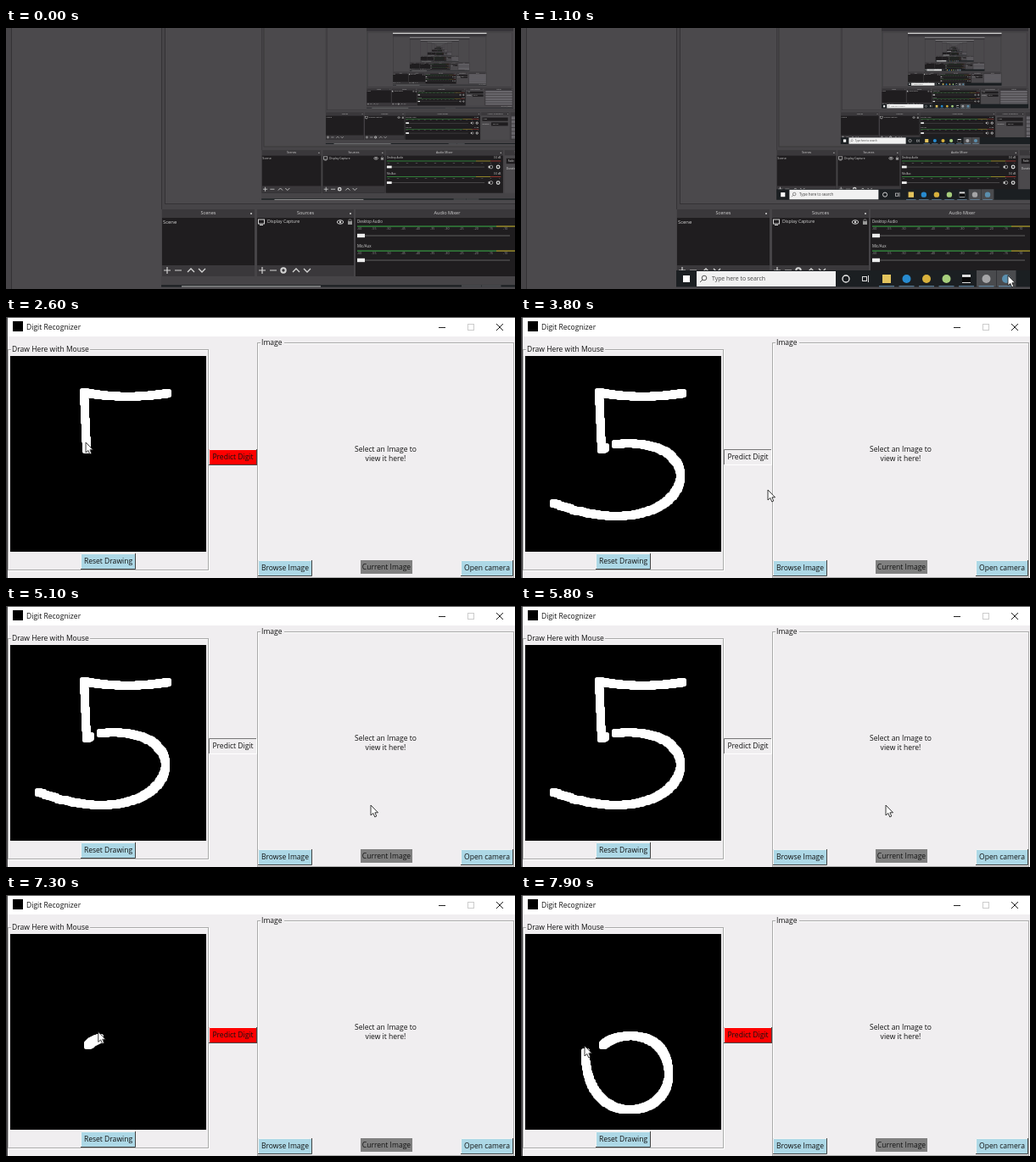
An HTML page with a canvas for the animation above (8 s loop, 600 by 308 pixels).

```html
<!DOCTYPE html>
<html lang="en">
<head>
<meta charset="utf-8">
<title>Digit Recognizer</title>
<style>
html, body { margin: 0; width: 100%; height: 100%; overflow: hidden; background: #4b494c; }
canvas { display: block; }
</style>
</head>
<body>
<canvas id="stage" width="600" height="308"></canvas>
<script>
const c = document.getElementById('stage').getContext('2d');
const LOOP = 8000, WINDOW_OPENS = 1300, CLEARED = 6880;

function rect(color, x, y, w, h) {
  c.fillStyle = color;
  c.fillRect(x, y, w, h);
}

function frameRect(color, x, y, w, h) {
  c.strokeStyle = color;
  c.lineWidth = 1;
  c.strokeRect(x + 0.5, y + 0.5, w, h);
}

function text(s, x, y, size = 8.55, color = '#111', align = 'left') {
  c.font = size + 'px "Open Sans", "Noto Sans", sans-serif';
  c.textAlign = align;
  c.textBaseline = 'middle';
  c.fillStyle = color;
  c.fillText(s, x, y);
}

function line(color, width, ...p) {
  c.strokeStyle = color;
  c.lineWidth = width;
  c.beginPath();
  for (let i = 0; i < p.length; i += 2) c.lineTo(p[i], p[i + 1]);
  c.stroke();
}

function circle(x, y, r, color, width) {
  c.beginPath();
  c.arc(x, y, r, 0, 7);
  c.fillStyle = c.strokeStyle = color;
  c.lineWidth = width || 1;
  width ? c.stroke() : c.fill();
}

// ---- Recorder screen, nested inside its own preview ----
const LIGHT = '#d4d4d4', BLACK = '#1f1d1f', HEADER = '#3a383b', PANEL = '#4b494c', RIM = '#343235';
const LEFT = 183, TOP = -67, WIDTH = 660, BOTTOM = 305.6;

function dock(title, x, w, fill = BLACK) {
  rect(HEADER, x, 214, w, 10);
  text(title, x + w / 2, 219, 5.5, LIGHT, 'center');
  rect('#aaa', x + w - 5, 218, 2, 2);
  rect(fill, x, 224, w, 69);
}

function listDock(title, x, w, gear) {
  dock(title, x, w);
  rect(HEADER, x, 280, w, 13);
  const y = 286, plus = x + 6, up = plus + (gear ? 40 : 28), down = up + 13;
  line(LIGHT, 1.2, plus - 4, y, plus + 4, y);
  line(LIGHT, 1.2, plus, y - 4, plus, y + 4);
  line(LIGHT, 1.2, plus + 9, y, plus + 17, y);
  if (gear) circle(plus + 25, y, 2.7, LIGHT, 2);
  line(LIGHT, 1.3, up - 4, y + 2, up, y - 2, up + 4, y + 2);
  line(LIGHT, 1.3, down - 4, y - 2, down, y + 2, down + 4, y - 2);
}

function channel(name, y) {
  const x = 414;
  text(name, x, y, 4.4, LIGHT);
  text('0.0 dB', 624, y, 4.4, LIGHT, 'right');
  rect('#35913f', x, y + 4.4, 164, 1.3);
  rect('#a99a2c', x + 164, y + 4.4, 27, 1.3);
  rect('#a8382f', x + 191, y + 4.4, 19, 1.3);
  for (let i = 0; i <= 12; i++) text(i * 5 - 60, x + i * 17.2, y + 8.5, 3.6, '#999');
  rect('#666', x, y + 15.6, 180, 0.9);
  rect('#eee', x, y + 13.8, 9, 4.4);
  rect(LIGHT, 601, y + 14, 3, 4);
  circle(606, y + 16, 3, LIGHT, 1);
  circle(619, y + 16, 2.8, LIGHT, 2);
}

function taskbar(drop) {
  const y = 286 + drop, mid = y + 10;
  rect('#1b1f22', LEFT, y, WIDTH, 23);
  rect('#fff', 191, mid - 4, 8, 8);
  rect(drop > 10 ? '#aaa' : '#f1f1f1', 207, y + 1, 164, 18);
  circle(216, mid - 1, 2.8, '#444', 0.9);
  line('#444', 0.9, 214, mid + 1, 211, mid + 4);
  text('Type here to search', 225, mid, 6.9, '#444');
  circle(383, mid, 4, '#eee', 1.3);
  frameRect('#ddd', 402, mid - 3, 5, 5);
  rect('#ddd', 409, mid - 4, 1, 8);
  ['#e3c45e', '#278bd0', '#d8b13c', '#a7cf7c', '#ddd', '#a5a5a7', '#5b8fae'].forEach((color, i) => {
    const x = 431 + i * 23.5;
    if (i > 4) rect('#4a4b4e', x - 11.5, y, 23, 20);
    if (i % 2 || i > 4 || i == 2) circle(x, mid, 5, color);
    else rect(color, x - 5, mid - 5, 10, 10);
    rect('#76a9cf', x - 9, y + 18.4, 18, 1.1);
  });
  rect('#080808', 520, mid - 2, 10, 6);
}

function recorder(depth, drop) {
  c.save();
  c.beginPath();
  c.rect(LEFT, TOP, WIDTH, BOTTOM - TOP);
  c.clip();
  rect('#464447', LEFT, TOP, WIDTH, BOTTOM - TOP);
  rect(PANEL, 188, -37, 648, 244);
  frameRect(RIM, 187, -37, 648, 244);
  line(RIM, 1, LEFT + 0.5, TOP, LEFT + 0.5, 214);
  rect('#e8e8e8', LEFT, TOP, WIDTH, 9);
  rect('#353337', LEFT, TOP + 9, WIDTH, 16);

  listDock('Scenes', 184, 109, false);
  text('Scene', 185, 229, 5.9, LIGHT);
  listDock('Sources', 296, 114, true);
  frameRect(LIGHT, 297, 225.5, 7, 5);
  rect(LIGHT, 299, 232, 4, 1);
  text('Display Capture', 308, 229, 5.2, LIGHT);
  c.beginPath();
  c.ellipse(394, 229, 3.7, 2.2, 0, 0, 7);
  c.stroke();
  circle(394, 229, 1.2, LIGHT);
  rect('#999', 403, 228, 5, 4);
  circle(405.5, 227.5, 1.7, '#999', 0.8);
  dock('Audio Mixer', 412, 216);
  channel('Desktop Audio', 229);
  channel('Mic/Aux', 258);
  dock('Scene Transitions', 631, 81, PANEL);
  rect(BLACK, 634, 229, 74, 10);
  text('Fade', 637, 234, 5, LIGHT);
  text('Duration', 634, 248, 5, LIGHT);
  rect(BLACK, 660, 243, 48, 10);
  text('300 ms', 664, 248, 5, LIGHT);
  dock('Controls', 715, 126, HEADER);
  for (let i = 0; i < 6; i++) rect('#67656a', 718, 226 + i * 11, 120, 9);
  text('CPU: 4.1%, 30.00 fps', 836, 299, 5, LIGHT, 'right');

  if (depth < 10) {
    c.save();
    c.translate(511, 20);
    c.scale(0.64, 0.64);
    c.translate(-511, -20);
    recorder(depth + 1, drop);
    c.restore();
  }
  taskbar(drop);
  c.restore();
}

function recorderScene(t) {
  rect(PANEL, 0, 0, 600, 308);
  rect('#464447', 0, 0, 6, 308);
  line(RIM, 1, 6.5, 0, 6.5, 308);
  recorder(0, 17.4 * Math.max(0, 1 - t / 200));
}

// ---- Pointer path: Bézier moves, each starting where the last one ended ----
const moves = [];
let last = [575, 300];

function go(start, end, ink, ...points) {
  moves.push({ start, end, ink, points: [last, ...points] });
  last = points[points.length - 1];
}

go(1600, 2100, false, [190, 90]);
go(2100, 2400, true, [140, 98], [92, 89]);
go(2400, 2600, true, [95, 156]);
go(2600, 2680, true, [99, 154]);
go(2700, 2800, false, [112, 150]);
go(2800, 3350, true, [240, 138], [200, 280], [39, 220]);
go(3350, 3600, false, [270, 172]);
go(3650, 3800, false, [292, 212]);
go(4000, 4500, false, [431, 243]);
go(6200, 6700, false, [147, 272]);
go(6700, 6820, false, [135, 296]);
go(6900, 7200, false, [97, 177]);
go(7250, 7520, true, [112, 161], [174, 156], [174, 212]);
go(7520, 7900, true, [174, 265], [76, 278], [76, 186]);

function bezier(points, f) {
  if (points.length == 1) return points[0];
  const a = bezier(points.slice(0, -1), f), b = bezier(points.slice(1), f);
  return a.map((v, k) => v + (b[k] - v) * f);
}

const progress = (m, t) => Math.max(0, Math.min(1, (t - m.start) / (m.end - m.start)));

// The brush stamps blunt squares on whole pixels.
function drawInk(t) {
  c.fillStyle = '#fff';
  c.beginPath();
  for (const m of moves) {
    if (!m.ink || t <= m.start || (m.start < CLEARED) != (t < CLEARED)) continue;
    const end = progress(m, t);
    for (let i = 0; i <= 120; i++) {
      const [x, y] = bezier(m.points, end * i / 120).map(Math.round);
      c.roundRect(x - 5, y - 5, 10, 10, 2.5);
    }
  }
  c.fill();
}

function pointer(t) {
  const m = moves.filter(m => m.start <= t).pop() || moves[0];
  const [x, y] = bezier(m.points, progress(m, t));
  c.save();
  c.translate(x - 1, y - 8);
  c.beginPath();
  for (const p of [[0, 0], [0, 12], [2.8, 9.5], [4.8, 14], [6.8, 13], [4.9, 8.8], [8.5, 8.8]])
    c.lineTo(...p);
  c.closePath();
  c.fillStyle = '#fff';
  c.fill();
  c.strokeStyle = '#222';
  c.lineWidth = 0.9;
  c.stroke();
  c.restore();
}

// ---- Application window ----
const FACE = '#f0eef0', BLUE = '#add8e6';

function button(label, color, x, y, w, h, sunken) {
  rect(color, x, y, w, h);
  const r = x + w - 0.5, b = y + h - 0.5;
  line(sunken ? '#777' : '#f4f4f4', 1, x + 0.5, b, x + 0.5, y + 0.5, r, y + 0.5);
  line(sunken ? '#fff' : '#444', 1, x, b, r, b, r, y);
  text(label, x + w / 2, y + h / 2 + 0.5, 8.55, '#111', 'center');
}

function group(label, x, y, w, h, labelWidth) {
  frameRect('#fff', x + 1, y + 1, w, h);
  frameRect('#aaa', x, y, w, h);
  rect(FACE, x + 4, y - 4, labelWidth, 9);
  text(label, x + 5, y + 0.5);
}

function appScene(t) {
  rect(FACE, 0, 0, 600, 308);
  rect('#fff', 0, 0, 600, 23);
  rect('#555', 0, 0, 600, 1);
  rect('#454446', 0, 0, 2, 308);
  rect('#000', 8, 5, 12, 12);
  text('Digit Recognizer', 24, 12.5);
  line('#222', 1, 510, 12.5, 518, 12.5);
  frameRect('#ccc', 544, 8, 7, 7);
  line('#222', 1, 578, 8, 586, 16);
  line('#222', 1, 586, 8, 578, 16);

  group('Draw Here with Mouse', 2, 38, 236, 260, 93);
  group('Image', 296, 30, 302, 277, 28);
  rect('#000', 5, 46, 231, 231);
  drawInk(t);

  const hover = t > 3500 && t < 6000, resetHover = t > 6790 && t < 6950;
  button('Predict Digit', hover ? FACE : '#fe0000', 239, 156, 57, 19, hover && t > 3600);
  button('Reset Drawing', resetHover ? FACE : BLUE, 88, 279, 65, 19,
    resetHover && t > 6830 && t < CLEARED);
  button('Browse Image', BLUE, 297, 287, 64, 19);
  button('Open camera', BLUE, 536, 287, 62, 19);
  rect('#808080', 418, 287, 61, 16);
  text('Current Image', 448.5, 295.5, 8.55, '#111', 'center');
  text('Select an Image to', 447.5, 156.5, 8.55, '#111', 'center');
  text('view it here!', 447.5, 167.5, 8.55, '#111', 'center');
}

function frame() {
  const t = performance.now() % LOOP;
  t < WINDOW_OPENS ? recorderScene(t) : appScene(t);
  if (t > 1000) pointer(t);
  requestAnimationFrame(frame);
}
frame();
</script>
</body>
</html>
```
